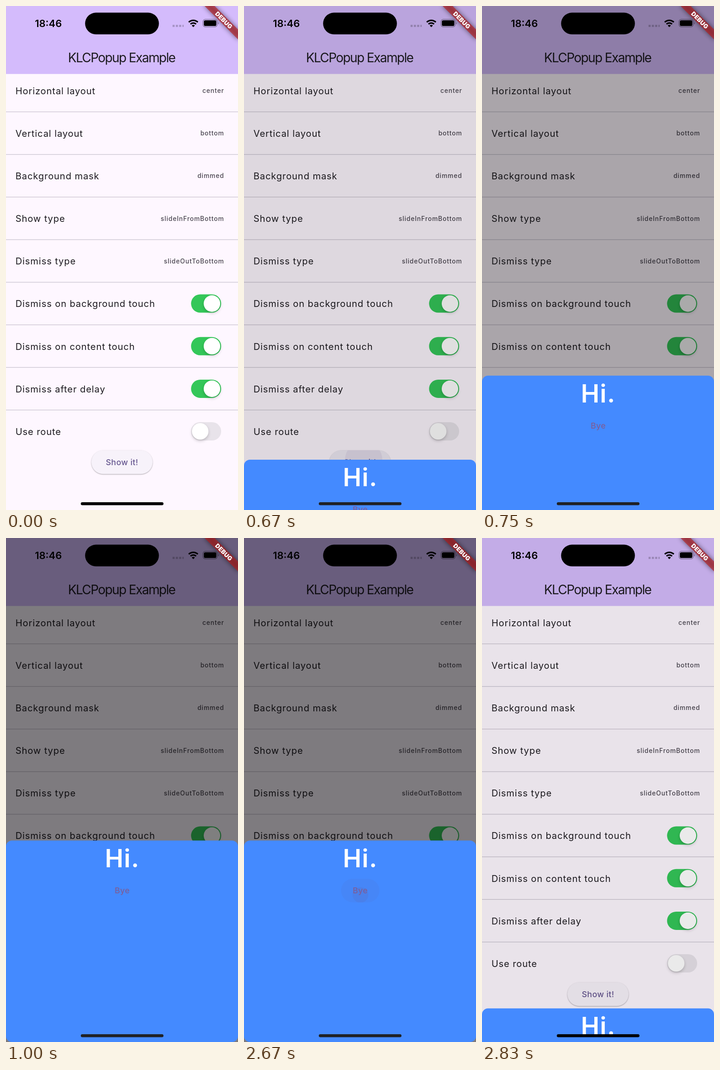
An HTML page for the animation above (2.91 s loop, 508x1102 px).

```html
<!DOCTYPE html>
<html lang="en">
<head>
<meta charset="utf-8">
<title>Popup example</title>
<style>
  html, body { margin: 0; width: 100%; height: 100%; overflow: hidden; background: #fef7ff; }
  svg { display: block; font-family: Inter, sans-serif; }
  .label { font-size: 20.1px; letter-spacing: .9px; fill: #1d1b20; }
  .value { font-size: 13.8px; letter-spacing: .9px; font-weight: 500; fill: #49454f; text-anchor: end; }
  .title { font-size: 28px; letter-spacing: -1.6px; fill: #1d1b20; text-anchor: middle; }
  .button { font-size: 17.7px; letter-spacing: .4px; font-weight: 500; text-anchor: middle; }
  .thumb { filter: drop-shadow(0 3px 3px #0003); }
</style>
</head>
<body>
<svg width="508" height="1102" viewBox="0 0 508 1102">
  <defs>
    <clipPath id="showClip"><rect x="187" y="971.5" width="134" height="51.7" rx="25.85"/></clipPath>
    <clipPath id="byeClip"><rect x="212.5" y="83.5" width="84" height="51.7" rx="25.85"/></clipPath>
    <filter id="blur" x="-50%" y="-150%" width="200%" height="400%"><feGaussianBlur stdDeviation="5.1"/></filter>
  </defs>

  <rect width="508" height="1102" fill="#fef7ff"/>
  <rect width="508" height="148.6" fill="#d4bbfc"/>
  <text class="title" x="253" y="123">KLCPopup Example</text>
  <g id="rows"></g>
  <rect x="187" y="971.5" width="134" height="51.7" rx="25.85" fill="#f7f2fa"
        style="filter: drop-shadow(0 1.3px 1.3px #0005)"/>
  <text class="button" x="254" y="1003.7" fill="#65558f">Show it!</text>
  <g id="showRipple" clip-path="url(#showClip)" fill="#65558f">
    <rect x="187" y="971" width="134" height="53" fill-opacity=".05"/>
    <circle cx="262" cy="993" r="41" fill-opacity=".09"/>
  </g>

  <rect id="dim" width="508" height="1102"/>

  <g id="popup">
    <rect width="508" height="440.5" rx="13" fill="#448aff"/>
    <text x="254.6" y="58.5" font-size="54.3" font-weight="600" letter-spacing="1.4" text-anchor="middle" fill="#fff">Hi.</text>
    <g id="byeRipple" clip-path="url(#byeClip)" fill="#65558f">
      <rect x="212" y="83" width="85" height="53" fill-opacity=".07"/>
      <circle id="byeSpot" cx="255" cy="119" fill-opacity=".12"/>
    </g>
    <text class="button" x="254.5" y="115.6" fill="#7b5e9b">Bye</text>
  </g>

  <g transform="translate(508) rotate(45)">
    <rect x="-51.7" y="36.2" width="103.4" height="15.5" fill-opacity=".5" filter="url(#blur)"/>
    <rect x="-51.7" y="36.2" width="103.4" height="15.5" fill="#b71c1c" fill-opacity=".627"/>
    <text y="48.7" font-size="13.2" font-weight="900" letter-spacing=".2" text-anchor="middle" fill="#fff">DEBUG</text>
  </g>

  <text x="92.7" y="45.8" font-size="22" font-weight="600" text-anchor="middle">18:46</text>
  <rect x="173.2" y="14.6" width="161.6" height="47.4" rx="23.7"/>
  <path d="M364.7 43.5h24.4" stroke="#000" stroke-opacity=".22" stroke-width="4.4" stroke-dasharray="4.6 2.6"/>
  <g fill="none" stroke="#000" stroke-width="3.3">
    <path d="M400.2 35.4a14 14 0 0 1 19.8 0M404 39.6a8.7 8.7 0 0 1 12.2 0"/>
    <path d="M410.1 46.2l-3.4-3.5a4.9 4.9 0 0 1 6.8 0z" fill="#000" stroke="none"/>
    <rect x="431.2" y="29.2" width="31.4" height="16.6" rx="5.2" stroke-width="1.2" stroke-opacity=".4"/>
    <path d="M464.4 35.2a3.2 3.2 0 0 1 0 5.2z" fill="#000" fill-opacity=".45" stroke="none"/>
    <rect x="433.2" y="31.2" width="27.4" height="12.6" rx="3.4" fill="#000" stroke="none"/>
  </g>
  <rect id="home" x="163.8" y="1085" width="181" height="6.5" rx="3.25"/>
</svg>
<script>
const $ = id => document.getElementById(id);
const LOOP = 2910, SLIDE = 192, SHOW_AT = 622, HIDE_AT = 2670;
const TICKS = [0, 580, 670, 750, 830, 910, 1000, 2670, 2750, 2830];

const rows = [
  ['Horizontal layout', 'center'],
  ['Vertical layout', 'bottom'],
  ['Background mask', 'dimmed'],
  ['Show type', 'slideInFromBottom'],
  ['Dismiss type', 'slideOutToBottom'],
  ['Dismiss on background touch', true],
  ['Dismiss on content touch', true],
  ['Dismiss after delay', true],
  ['Use route', false],
];

const toggle = (on, y) => `
  <rect x="405.2" y="${y - 20}" width="65.9" height="40" rx="20" fill="${on ? '#34c759' : '#e8e3ea'}"/>
  <circle class="thumb" cx="${on ? 451 : 425.2}" cy="${y}" r="18.1" fill="#fff"/>`;

$('rows').innerHTML = rows.map(([label, value], i) => {
  const y = 185.3 + 93.14 * i;
  const control = typeof value === 'string'
    ? `<text class="value" x="477.7" y="${y + 4.8}">${value}</text>`
    : toggle(value, y - .4);
  const divider = i < rows.length - 1
    ? `<rect y="${y + 45.5}" width="508" height="1.3" fill="#cac4d0"/>` : '';
  return `<text class="label" x="20.7" y="${y + 7.4}">${label}</text>${control}${divider}`;
}).join('');

const clamp = v => Math.max(0, Math.min(1, v));
const show = (id, on) => $(id).setAttribute('visibility', on ? 'visible' : 'hidden');

function draw(t) {
  const open = clamp(Math.min((t - SHOW_AT) / SLIDE, 1 - (t - HIDE_AT) / SLIDE));
  $('popup').setAttribute('transform', `translate(0 ${1102 - 440.5 * open})`);
  $('dim').setAttribute('fill-opacity', open / 2);
  $('home').setAttribute('fill', open > .2 ? '#202124' : '#000');
  show('showRipple', t >= 670 && t < HIDE_AT);
  show('byeRipple', t >= HIDE_AT);
  $('byeSpot').setAttribute('r', 17 + Math.max(0, t - HIDE_AT) * .2);
}

function frame(now) {
  const t = now % LOOP;
  draw(TICKS.findLast(tick => tick <= t));
  requestAnimationFrame(frame);
}
requestAnimationFrame(frame);
</script>
</body>
</html>
```
